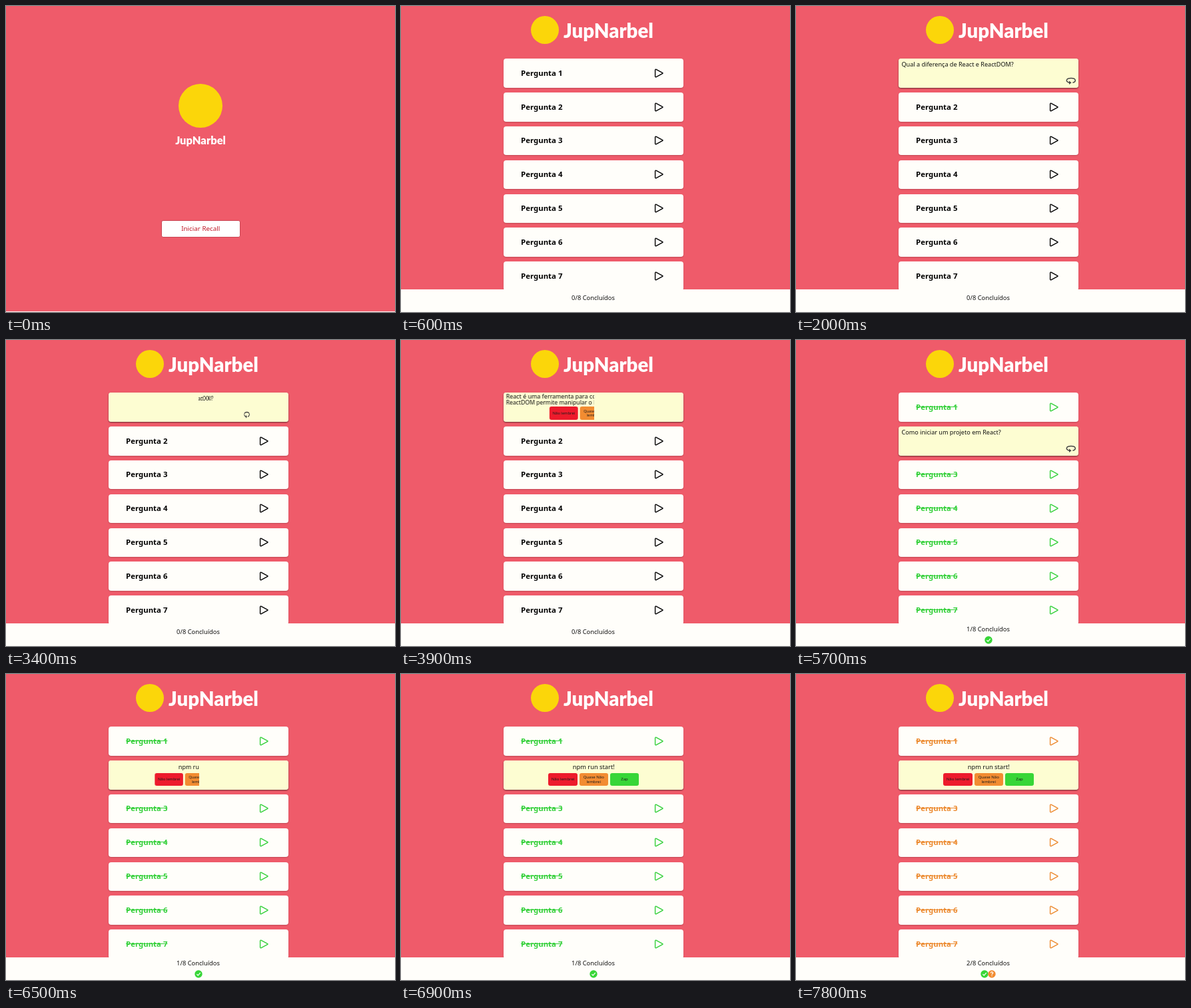
These frames come from a looping animation (584 px wide and 460 px high, 8000 ms). An HTML page:

```html
<!DOCTYPE html>
<html lang="pt-BR">
<head>
<meta charset="utf-8">
<title>Flashcards</title>
<style>
  * { box-sizing: border-box; }
  html, body { margin: 0; width: 100%; height: 100%; overflow: hidden; }
  body { position: relative; background: #ef5b6a; color: #111; font: 9.1px/12px "Noto Sans", sans-serif; }
  div, p, b, button, svg, i { position: absolute; margin: 0; white-space: nowrap; }
  svg { fill: none; stroke: currentColor; }

  .stage { left: 0; top: 0; width: 584px; height: 460px; overflow: hidden; background: #ef5b6a; }
  .mid { transform: translate(-50%, -50%); }
  .mark { border-radius: 50%; background: #fbd60a; }
  .brand { color: #fff; font: 900 29.4px/1 Lato, sans-serif; }

  .home { animation: home 8s step-end infinite; }
  .home .brand { font-size: 16.5px; }
  .start {
    left: 233px; top: 321.5px; width: 118.5px; height: 26.5px; padding: 0;
    border: 1px solid #c94553; border-radius: 3px; background: #fff;
    color: #c01826; font: 9.8px "Noto Sans", sans-serif;
  }
  .rim { left: 0; bottom: 0; width: 100%; height: 1px; background: #fdf3f1; }

  .card {
    left: 153.5px; top: calc(79.3px + var(--n) * 50.83px); width: 270.5px; height: 43.5px;
    border-radius: 4px; background: #fffefa; box-shadow: 0 1px 2px #0003;
  }
  .label { inset: 0; animation: tint 8s step-end infinite; }
  .label b { left: 26.5px; top: 13.5px; font-size: 11.4px; line-height: 16px; }
  .label b { text-decoration: line-through transparent; animation: strike 8s step-end infinite; }
  .label svg { left: 226.5px; top: 14.5px; stroke-width: 1.4; }

  .open { inset: 0; border-radius: 4px; background: #fdfdd2; box-shadow: 0 1px 2px #0006; animation: 8s step-end infinite; }
  .first { animation-name: first; --lag: 0ms; }
  .second { animation-name: second; --lag: -5392ms; }
  .face { inset: 0; backface-visibility: hidden; }
  .front { animation: turn-away 8s linear var(--lag) infinite, right-half 8s step-end var(--lag) infinite; }
  .back { animation: turn-in 8s linear var(--lag) infinite, left-half 8s step-end var(--lag) infinite; }
  .front p { left: 4.5px; top: 2.5px; }
  .front svg { left: 250.5px; top: 27.5px; color: #444; stroke-width: 1.5; }
  .back p { left: 0; }
  .back button {
    top: var(--y); width: 43.5px; height: 19.5px; padding: 0; border: 0; border-radius: 3px;
    color: #1c1c1c; font: 6px/6.3px "Noto Sans", sans-serif;
  }
  .no { left: 67.3px; background: #ed1b2c; }
  .almost { left: 113.5px; background: #f28c31; }
  .zap { left: 159.8px; background: #37d637; }

  .foot { left: 0; top: 426px; width: 584px; height: 34px; background: #fffefa; font-size: 9.35px; }
  .foot > div { inset: 0; animation: 8s step-end infinite; }
  .none { animation-name: none-done !important; }
  .one { animation-name: one-done !important; }
  .two { animation-name: two-done !important; }
  .foot p { left: 288.5px; }
  .foot svg { top: 18.6px; stroke: #fff; stroke-width: 1.3; }

  @keyframes home { 0% { opacity: 1 } 7.5%, 100% { opacity: 0 } }
  @keyframes tint { 0% { color: #000 } 60% { color: #34d03a } 92.5%, 100% { color: #ec8a2f } }
  @keyframes strike {
    0% { text-decoration-color: transparent }
    60% { text-decoration-color: #34d03a }
    92.5%, 100% { text-decoration-color: #ec8a2f }
  }
  @keyframes first { 0% { opacity: 0 } 25% { opacity: 1 } 67.5%, 100% { opacity: 0 } }
  @keyframes second { 0% { opacity: 0 } 67.5%, 100% { opacity: 1 } }
  @keyframes turn-away { 0%, 39.5% { transform: rotateY(0deg) } 49.5%, 100% { transform: rotateY(-180deg) } }
  @keyframes turn-in { 0%, 39.5% { transform: rotateY(180deg) } 49.5%, 100% { transform: rotateY(0deg) } }
  @keyframes right-half { 0% { clip-path: none } 39.5%, 100% { clip-path: inset(0 0 0 50%) } }
  @keyframes left-half { 0% { clip-path: inset(0 50% 0 0) } 49.5%, 100% { clip-path: none } }
  @keyframes none-done { 0% { opacity: 1 } 60%, 100% { opacity: 0 } }
  @keyframes one-done { 0% { opacity: 0 } 60% { opacity: 1 } 92.5%, 100% { opacity: 0 } }
  @keyframes two-done { 0% { opacity: 0 } 92.5%, 100% { opacity: 1 } }
</style>
</head>
<body>
<div class="stage">
  <i class="mark mid" style="left:216px;top:35.5px;width:42px;height:42px"></i>
  <div class="brand mid" style="left:311.5px;top:36.5px">JupNarbel</div>
  <div id="deck"></div>
  <div class="foot" id="foot"></div>
  <div class="stage home">
    <i class="mark mid" style="left:292px;top:149.5px;width:66px;height:66px"></i>
    <div class="brand mid" style="left:292px;top:202px">JupNarbel</div>
    <button class="start">Iniciar Recall</button>
    <div class="rim"></div>
  </div>
</div>
<script>
  const play = `<svg width="14" height="14"><path d="M1.6 2.3v9.4c0 1 .8 1.4 1.6 1l9.2-5c.8-.5.8-1 0-1.4L3.2 1.3c-.8-.4-1.6 0-1.6 1z"/></svg>`;
  const flip = `<svg width="16" height="12"><path d="M5 8.2C-.8 6.8 .2 1.6 8 1.6S16 6.8 10.4 8.2"/>
    <path d="M5 5.4v5.6l3.6-2.8z" fill="currentColor" stroke="none"/></svg>`;
  const replies = `<button class="no">Não lembrei</button>
    <button class="almost">Quase Não<br>lembrei</button><button class="zap">Zap</button>`;

  const openCard = (name, question, answer, y) => `<div class="open ${name}">
    <div class="face front"><p>${question}</p>${flip}</div>
    <div class="face back" style="--y:${y}px">${answer}${replies}</div></div>`;

  const opened = [
    openCard('first', 'Qual a diferença de React e ReactDOM?',
      `<p style="top:.3px;font-size:9.2px">React é uma ferramenta para construção de interfaces,</p>
       <p style="top:9px;font-size:8.9px">ReactDOM permite manipular o DOM dentro dos componentes!</p>`, 21.4),
    openCard('second', 'Como iniciar um projeto em React?',
      `<p class="mid" style="left:50%;top:9.8px;font-size:9.3px">npm run start!</p>`, 18.9)
  ];

  deck.innerHTML = Array.from({ length: 8 }, (_, n) => `<div class="card" style="--n:${n}">
    <div class="label"><b>Pergunta ${n + 1}</b>${play}</div>${opened[n] || ''}</div>`).join('');

  const badge = (x, color, mark) => `<svg width="12" height="12" style="left:${x - 6}px">
    <circle cx="6" cy="6" r="5.7" fill="${color}" stroke="none"/><path d="${mark}"/></svg>`;
  const check = x => badge(x, '#37d637', 'M3.4 6.2l1.9 1.9 3.5-4');
  const doubt = x => badge(x, '#f28c31', 'M4.4 4.6c0-2.2 3.3-2.2 3.3-.2 0 1.2-1.6 1.2-1.6 2.6M6.1 8.1v1.2');
  const tally = (name, count, y, badges = '') =>
    `<div class="${name}"><p class="mid" style="top:${y}px">${count}/8 Concluídos</p>${badges}</div>`;

  foot.innerHTML = tally('none', 0, 13) + tally('one', 1, 9, check(288.5))
    + tally('two', 2, 9, check(283) + doubt(294.4));
</script>
</body>
</html>
```
